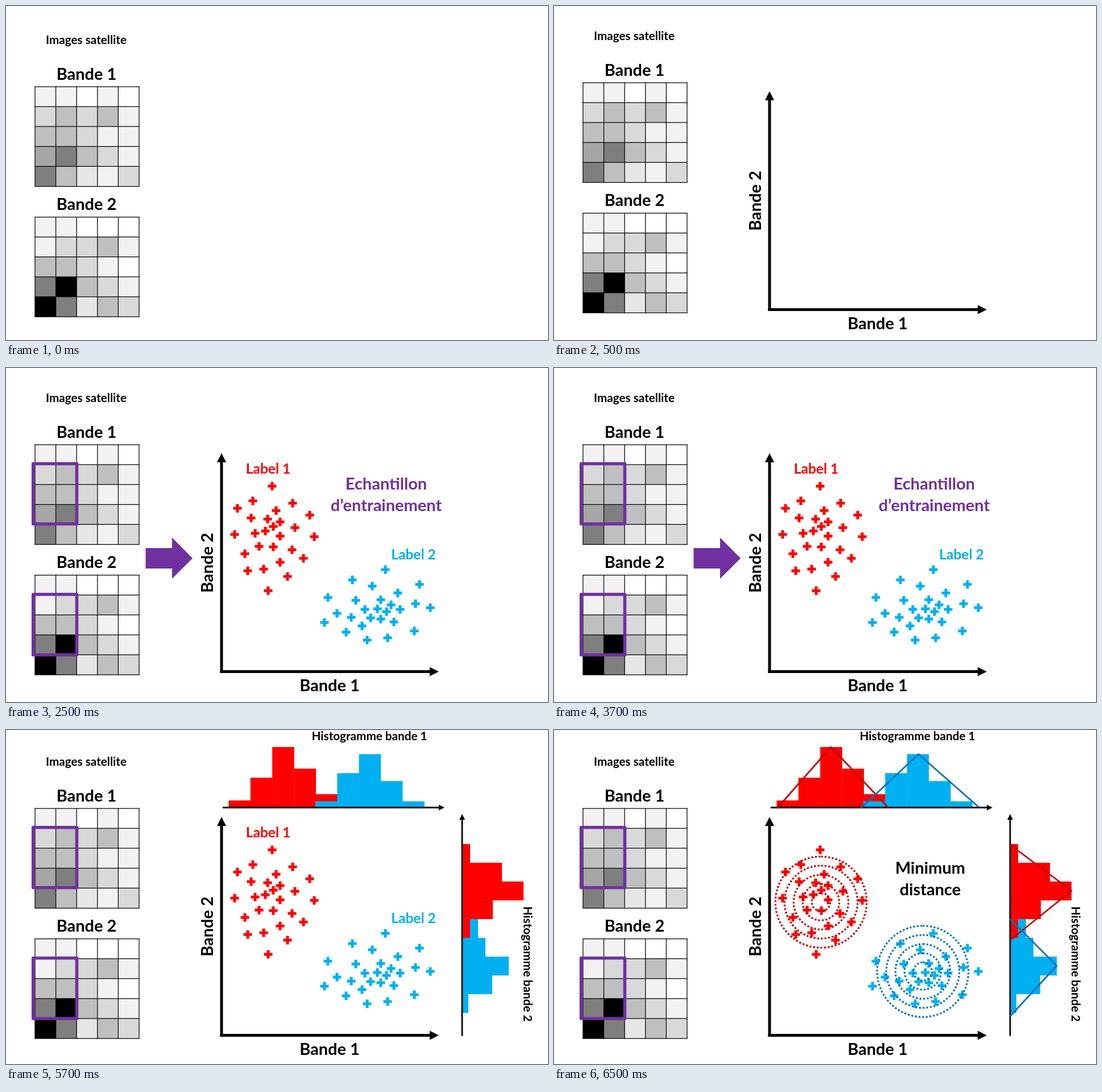
Recreate the animation shown at these times as an HTML page with a canvas. Size 953 by 588 pixels, loop 8 s.

```html
<!DOCTYPE html>
<html lang="fr">
<head>
<meta charset="utf-8">
<title>Classification</title>
<style>
html, body { margin: 0; width: 100%; height: 100%; overflow: hidden; background: #fff; }
canvas { display: block; width: 953px; height: 588px; }
</style>
</head>
<body>
<canvas id="stage" width="953" height="588"></canvas>
<script>
const ctx = document.getElementById('stage').getContext('2d');
const LOOP = 8000;
const STARTS = [0, 500, 2500, 4500, 6500];
const OFFSETS = [7, 0, 0, 3, 3];

const RED = '#ff0000', BLUE = '#00b0f0', DARK_RED = '#c00000', DARK_BLUE = '#0070c0';
const PURPLE = '#7030a0', BLACK = '#000';
const BIG = 29, MID = 24.6, SMALL = 20.7;

const GREYS = {
  W: '#fff', F: '#f2f2f2', E: '#e6e6e6', D: '#d9d9d9',
  B: '#bfbfbf', A: '#a6a6a6', G: '#7f7f7f', K: '#000'
};
const BAND1 = ['FFWFW', 'DBDBF', 'BBDFF', 'AGBDF', 'GBEFD'];
const BAND2 = ['FFWWW', 'FDDBF', 'BBDFW', 'GKBDF', 'KGEBD'];

const RED_POINTS = [
  [468, 208], [434, 234], [407, 247], [504, 238], [475, 251], [431, 264], [460, 266],
  [482, 271], [534, 259], [470, 279], [508, 281], [402, 293], [438, 291], [456, 287],
  [482, 296], [542, 297], [420, 327], [445, 314], [470, 315], [503, 320], [523, 335],
  [482, 342], [425, 357], [453, 354], [495, 367], [461, 392]
];
const BLUE_POINTS = [
  [667, 355], [609, 373], [644, 384], [727, 381], [566, 404], [615, 409], [659, 408],
  [689, 396], [677, 417], [720, 415], [746, 422], [582, 432], [631, 425], [653, 424],
  [669, 429], [693, 425], [607, 439], [641, 440], [659, 442], [682, 447], [560, 448],
  [626, 454], [598, 465], [718, 463], [671, 475], [635, 479]
];

function text(str, x, y, size, color = BLACK, angle = 0) {
  ctx.save();
  ctx.translate(x, y);
  ctx.rotate(angle);
  ctx.font = `bold ${size}px Lato, sans-serif`;
  ctx.textAlign = 'center';
  ctx.fillStyle = color;
  ctx.fillText(str, 0, 0);
  ctx.restore();
}

function polygon(points, color) {
  ctx.beginPath();
  points.forEach(p => ctx.lineTo(...p));
  ctx.fillStyle = color;
  ctx.fill();
}

function polyline(points, color, width) {
  ctx.beginPath();
  points.forEach(p => ctx.lineTo(...p));
  ctx.strokeStyle = color;
  ctx.lineWidth = width;
  ctx.stroke();
}

// Axis of the given length, pointing right or (angle = -90°) up.
function axis(x, y, length, angle, width, head, half) {
  ctx.save();
  ctx.translate(x, y);
  ctx.rotate(angle);
  polyline([[0, 0], [length - head + 1, 0]], BLACK, width);
  polygon([[length, 0], [length - head, -half], [length - head, half]], BLACK);
  ctx.restore();
}

function grid(rows, top) {
  const left = 51, w = 36.6, h = 35.1;
  rows.forEach((row, r) => [...row].forEach((key, c) => {
    ctx.fillStyle = GREYS[key];
    ctx.fillRect(left + c * w, top + r * h, w, h);
  }));
  for (let i = 0; i <= 5; i++) {
    polyline([[left + i * w, top - 0.6], [left + i * w, top + 5 * h + 0.6]], BLACK, 1.25);
    polyline([[left - 0.6, top + i * h], [left + 5 * w + 0.6, top + i * h]], BLACK, 1.25);
  }
}

function bands() {
  text('Images satellite', 141, 60, SMALL);
  text('Bande 1', 141.5, 122.5, BIG);
  text('Bande 2', 141.5, 352, BIG);
  grid(BAND1, 135);
  grid(BAND2, 364.5);
}

function plotAxes() {
  axis(379, 537, 387, -Math.PI / 2, 5, 16, 8);
  axis(376.5, 534.5, 384.5, 0, 5, 16, 8);
  text('Bande 1', 569, 568.5, BIG);
  text('Bande 2', 364, 343, BIG, BLACK, -Math.PI / 2);
}

function selection() {
  ctx.strokeStyle = PURPLE;
  ctx.lineWidth = 5.5;
  ctx.strokeRect(47.7, 168.5, 76.8, 106);
  ctx.strokeRect(47.7, 398.5, 76.8, 106.5);
}

function crosses(points, color) {
  ctx.fillStyle = color;
  for (const [x, y] of points) {
    ctx.fillRect(x - 7.5, y - 2.5, 15, 5);
    ctx.fillRect(x - 2.5, y - 7.5, 5, 15);
  }
}

function labels() {
  text('Label 1', 461, 185.5, MID, RED);
  text('Label 2', 716.5, 336.5, MID, BLUE);
}

function trainingNote() {
  polygon([[245.5, 317], [292, 317], [292, 298.5], [328, 335],
    [292, 371], [292, 353], [245.5, 353]], PURPLE);
  text('Echantillon', 668.5, 214, BIG, PURPLE);
  text('d’entrainement', 668.5, 252, BIG, PURPLE);
}

function barsUp(left, tops, color) {
  const w = 38.3;
  ctx.fillStyle = color;
  tops.forEach((top, i) => ctx.fillRect(left + i * w, top, w + 0.3, 136 - top));
}

function barsRight(top, rights, color) {
  const h = 32.95;
  ctx.fillStyle = color;
  rights.forEach((right, i) => ctx.fillRect(802, top + i * h, right - 802, h + 0.3));
}

function histograms() {
  barsUp(391.5, [124, 84, 30, 68, 113], RED);
  barsUp(544, [125.5, 76, 42.5, 90, 125.5], BLUE);
  axis(381, 136.5, 390, 0, 2.8, 10, 5);
  text('Histogramme bande 1', 639, 18, SMALL);

  barsRight(333, [830, 843, 884, 855, 813], BLUE);
  barsRight(200.8, [816, 872, 910, 856, 816], RED);
  axis(802, 538.5, 390.5, -Math.PI / 2, 2.8, 10, 5);
  text('Histogramme bande 2', 910, 412, SMALL, BLACK, Math.PI / 2);
}

function rings(x, y, color) {
  ctx.save();
  ctx.strokeStyle = color;
  ctx.lineWidth = 3.2;
  ctx.setLineDash([3.2, 3.2]);
  for (let i = 1; i <= 5; i++) {
    ctx.beginPath();
    ctx.arc(x, y, i * 16.05, -Math.PI / 2, Math.PI * 1.5);
    ctx.stroke();
  }
  ctx.restore();
}

function distances() {
  polyline([[392, 138], [487, 30], [588, 137]], DARK_RED, 2.8);
  polyline([[539, 138], [641, 42.5], [747, 136]], DARK_BLUE, 2.8);
  polyline([[802, 202], [910, 283], [802, 370]], DARK_RED, 2.8);
  polyline([[802, 333], [884, 415], [802, 504]], DARK_BLUE, 2.8);
  rings(469.5, 303, DARK_RED);
  rings(648.5, 425, DARK_BLUE);
  text('Minimum', 661.5, 252.5, BIG);
  text('distance', 661.5, 290.5, BIG);
}

function draw(step) {
  ctx.fillStyle = '#fff';
  ctx.fillRect(0, 0, 953, 588);
  ctx.lineJoin = 'round';

  ctx.save();
  ctx.translate(0, OFFSETS[step]);
  bands();
  if (step >= 1) plotAxes();
  if (step >= 2) {
    selection();
    crosses(RED_POINTS, RED);
    crosses(BLUE_POINTS, BLUE);
    if (step < 4) labels();
  }
  if (step === 2) trainingNote();
  ctx.restore();

  if (step >= 3) histograms();
  if (step === 4) distances();
}

function tick() {
  const t = performance.now() % LOOP;
  draw(STARTS.findLastIndex(start => t >= start));
  requestAnimationFrame(tick);
}
tick();
</script>
</body>
</html>
```
